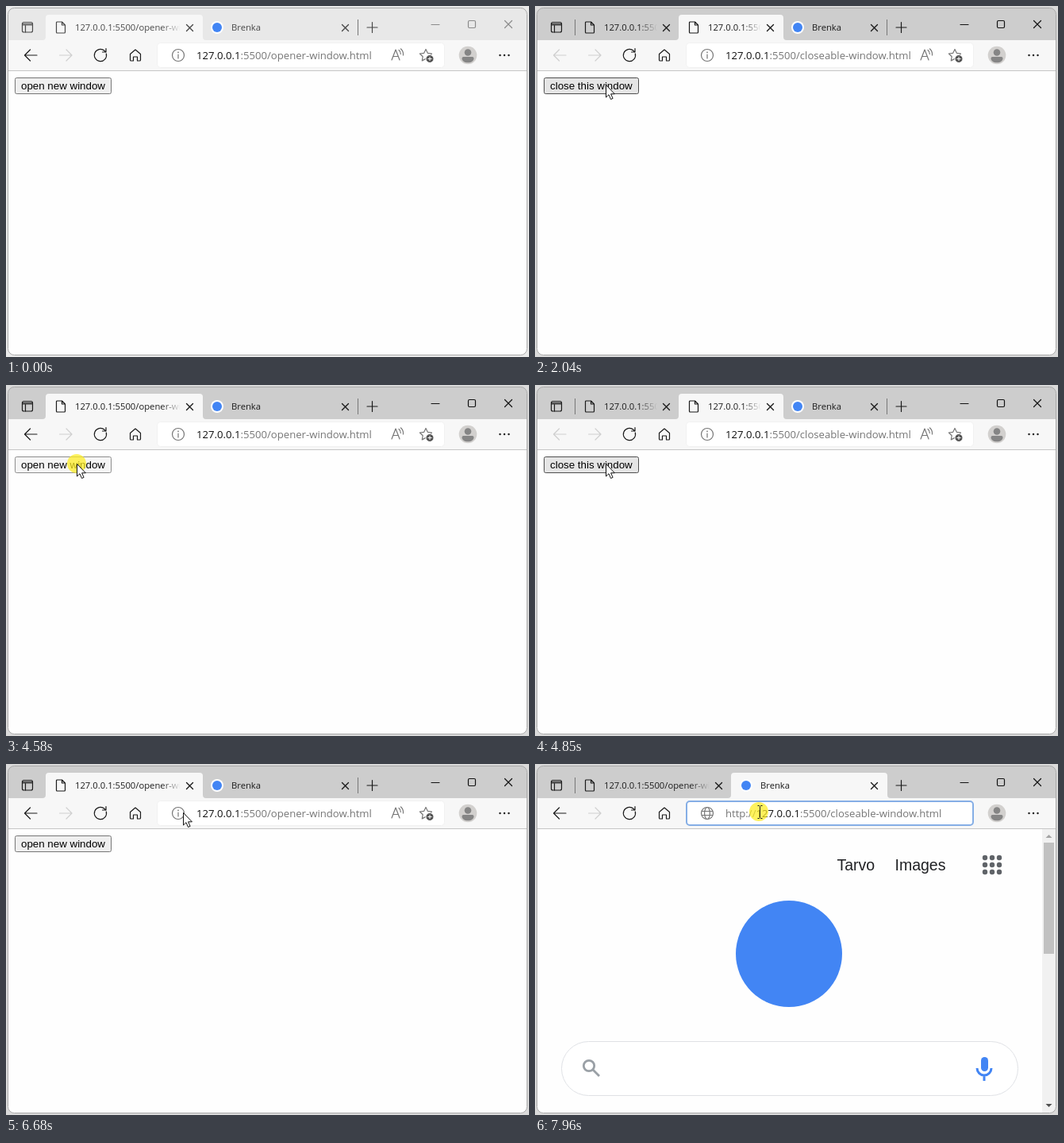
An HTML page that plays this animation: 659x442 px, repeating every 8000 ms.

```html
<!DOCTYPE html>
<html lang="en">
<head>
<meta charset="utf-8">
<title>Opening and closing a window</title>
<style>
html, body { margin: 0; width: 100%; height: 100%; overflow: hidden; }
svg { display: block; width: 659px; height: 442px; font-family: "Open Sans", "Noto Sans", sans-serif; }

/* every part shares one 8 s clock */
svg, .bar, .controls, .view, .btn, .sep-hover, .ring, .cursor, .arrow, .beam, .spot {
  animation: 8s step-end -4ms infinite;
}
svg { animation-name: ink; }
.bar { animation-name: bar; }
.controls { animation-name: controls; }
.opener { animation-name: opener; }
.closeable { animation-name: closeable; }
.search { animation-name: search; }
.btn { animation-name: btn; }
.sep-hover { animation-name: sep; }
.ring { animation-name: ring; }
.cursor { animation-name: move; }
.arrow { animation-name: arrow; }
.beam { animation-name: beam; }
.spot { animation-name: spot; }

.line { fill: none; stroke: currentColor; stroke-width: 1.2; stroke-linecap: round; stroke-linejoin: round; }
.dark { color: #1b1b1b; }
.grey { color: #767676; }
.off { color: #cfcfcf; }
.tab { font-size: 11.26px; }
.name { fill: currentColor; }
.url { font-size: 13.14px; fill: #767676; }
.url tspan { fill: #111; }
.label { font: 13.333px "Liberation Sans", Arial, sans-serif; fill: #000; }
.link { font: 19.5px "Liberation Sans", Arial, sans-serif; fill: #202124; }
.active { fill: #f7f7f7; }
stop { stop-color: currentColor; }
stop + stop { stop-opacity: 0; }

@keyframes ink { 0% { color: #484848; background: #eaeaea; } 22.125%, 100% { color: #1b1b1b; background: #dadada; } }
@keyframes bar { 0% { fill: #e8e8e8; } 22.125%, 100% { fill: #cdcdcd; } }
@keyframes controls { 0% { color: #8b8b8b; } 22.125%, 100% { color: #111; } }

@keyframes opener {
  0%, 44%, 77.25% { opacity: 1; }
  24.625%, 59.75%, 91.75%, 100% { opacity: 0; }
}
@keyframes closeable {
  0%, 44%, 77.25%, 100% { opacity: 0; }
  24.625%, 59.75% { opacity: 1; }
}
@keyframes search { 0% { opacity: 0; } 91.75%, 100% { opacity: 1; } }

/* normal, hovered, pressed */
@keyframes btn {
  0%, 24.625%, 44%, 59.75%, 77.25%, 80.875%, 100% { fill: #efefef; stroke: #767676; }
  16.25%, 23.75%, 25.5%, 43.125%, 44.875%, 58.875%, 60.625%, 76.375%, 78.125% { fill: #e5e5e5; stroke: #4f4f4f; }
  21.25%, 41.375%, 57.25%, 74.625% { fill: #f5f5f5; stroke: #8d8d8d; }
}
@keyframes sep { 0% { opacity: 1; } 87.75%, 100% { opacity: 0; } }
@keyframes ring { 0% { opacity: 0; } 98.625%, 100% { opacity: 1; } }

@keyframes move {
  0% { transform: translate(438px, 470px); }
  4.125% { transform: translate(438px, 430px); animation-timing-function: steps(4); }
  7.625% { transform: translate(292px, 346px); animation-timing-function: steps(4); }
  11.125% { transform: translate(162px, 206px); animation-timing-function: steps(3); }
  13.75% { transform: translate(100px, 114px); }
  14.625% { transform: translate(94px, 106px); }
  16.25% { transform: translate(90px, 101px); }
  17.125% { transform: translate(89px, 99px); }
  80.875% { transform: translate(112px, 93px); animation-timing-function: steps(3); }
  83.5% { transform: translate(223px, 61px); animation-timing-function: steps(3); }
  86.125% { transform: translate(283px, 31px); animation-timing-function: steps(3); }
  88.625% { transform: translate(296px, 24px); }
  93.5% { transform: translate(292px, 36px); }
  94.375% { transform: translate(286px, 53px); }
  95.25%, 100% { transform: translate(282px, 60px); }
}
@keyframes arrow { 0% { opacity: 1; } 94.375%, 100% { opacity: 0; } }
@keyframes beam { 0% { opacity: 0; } 94.375%, 100% { opacity: 1; } }
@keyframes spot {
  0%, 23.75%, 43.125%, 58.875%, 76.375%, 92.625% { opacity: 0; }
  21.25%, 41.375%, 57.25%, 74.625%, 90.875%, 97.75%, 100% { opacity: .72; }
}
</style>
</head>
<body>
<svg viewBox="0 0 659 442">
  <defs>
    <clipPath id="win"><rect x="2.5" y="2.5" width="654" height="437" rx="8"/></clipPath>
    <linearGradient id="fade1" gradientUnits="userSpaceOnUse" x1="130" x2="154"><stop/><stop offset="1"/></linearGradient>
    <linearGradient id="fade2" gradientUnits="userSpaceOnUse" x1="196" x2="220"><stop/><stop offset="1"/></linearGradient>
    <linearGradient id="fade3" gradientUnits="userSpaceOnUse" x1="261" x2="285"><stop/><stop offset="1"/></linearGradient>

    <path id="doc" class="line" d="M1.5 .5h6l4 4v9a1 1 0 0 1-1 1h-9a1 1 0 0 1-1-1v-12a1 1 0 0 1 1-1zM7.5 .5v4h4"/>
    <path id="cross" class="line" d="M-4 -4l8 8M4 -4l-8 8" style="stroke-width:1.35"/>
    <path id="sep" d="M.5 17v20" stroke="#777"/>
    <path id="back" class="line" d="M39 62H23.5m7-7l-7 7 7 7"/>
    <g id="icon"><circle r="8" fill="#fff"/><circle r="6" fill="#4285f4"/></g>

    <g id="tools" class="grey">
      <circle class="line" cx="217" cy="62" r="7.5"/>
      <path class="line" d="M217 61v5"/><circle cx="217" cy="58.3" r=".9" fill="#767676"/>
      <path class="line" d="M486 68l5-13 5 13m-8.300-4.500h6.600M495 55.500q2.500 2 2.300 5M497.500 54q3.500 3 3 8"/>
      <path class="line" d="M529 54.500l2.300 4.800 5.200.7-3.800 3.700.8 5.200-4.500-2.500-4.700 2.500.9-5.200-3.800-3.700 5.300-.7z"/>
      <circle cx="534" cy="66.500" r="5" fill="#555" stroke="#fff"/>
      <path d="M531.500 66.500h5m-2.500-2.500v5" stroke="#fff"/>
    </g>
  </defs>

  <g clip-path="url(#win)">
    <rect class="bar" width="659" height="50"/>
    <rect y="43" width="659" height="38" fill="#f7f7f7"/>
    <rect y="81" width="659" height="1" fill="#c6c6c6"/>
    <rect y="82" width="659" height="360" fill="#fefefe"/>

    <g class="controls">
      <path class="line" stroke-linecap="butt" d="M536 23.500h10M628.500 18.500l9 9m0-9l-9 9"/>
      <rect class="line" x="582.500" y="18.500" width="9" height="9" rx="1.500"/>
    </g>
    <rect class="line" x="20.500" y="20.500" width="13" height="12.500" rx="2"/>
    <path class="line" d="M21 22.500h12M21 24h12M24.500 24v9"/>
    <path class="line" d="M461.500 20.500v13M455 27h13"/>

    <g class="dark">
      <path class="line" d="M126.300 60a7.600 7.600 0 1 1-2.300-3.700l1.700 1.700m.300-4.500v4.500h-4.500"/>
      <path class="line" d="M156.500 60.500l6.500-5.500 6.500 5.500v7.500a1 1 0 0 1-1 1h-3v-5h-5v5h-3a1 1 0 0 1-1-1z"/>
      <path d="M622.500 62h.01M628 62h.01M633.500 62h.01" stroke="#222" stroke-width="2.500" stroke-linecap="round"/>
    </g>
    <path class="line off" d="M67.500 62H83m-7-7l7 7-7 7"/>
    <rect x="190.500" y="46.500" width="362" height="31" rx="4" fill="#fff" stroke="#f1f1f1"/>
    <circle cx="582" cy="62" r="11.300" fill="#d2d0ce"/>
    <circle cx="582" cy="58.500" r="4.300" fill="#858585"/>
    <path d="M574.500 66q0-2 2-2h11q2 0 2 2c0 3-3 5.300-7.500 5.300s-7.500-2.300-7.500-5.300z" fill="#858585"/>

    <g class="view opener">
      <path class="active" d="M46 43q4 0 4-4v-24q0-4 4-4h190q4 0 4 4v24q0 4 4 4z"/>
      <use href="#doc" x="63" y="19.500"/>
      <text class="tab" x="87" y="31" fill="url(#fade2)">127.0.0.1:5500/opener-window</text>
      <use href="#cross" x="231.500" y="27.500"/>
      <use href="#icon" x="266" y="27"/>
      <text class="tab name" x="284" y="31">Brenka</text>
      <use href="#cross" x="427.500" y="27.500"/>
      <use class="sep-hover" href="#sep" x="443"/>
      <use class="dark" href="#back"/>
      <use href="#tools"/>
      <text class="url" x="240" y="67"><tspan>127.0.0.1</tspan>:5500/opener-window.html</text>
      <rect class="btn" x="11.500" y="90.500" width="121" height="20" rx="2"/>
      <text class="label" x="19" y="105">open new window</text>
    </g>

    <g class="view closeable">
      <path class="active" d="M177 43q4 0 4-4v-24q0-4 4-4h124q4 0 4 4v24q0 4 4 4z"/>
      <use href="#sep" x="50"/>
      <use href="#doc" x="63" y="19.500"/>
      <text class="tab" x="87" y="31" fill="url(#fade1)">127.0.0.1:5500</text>
      <use href="#cross" x="165.500" y="27.500"/>
      <use href="#doc" x="194" y="19.500"/>
      <text class="tab" x="218" y="31" fill="url(#fade3)">127.0.0.1:5500</text>
      <use href="#cross" x="296.500" y="27.500"/>
      <use href="#icon" x="331" y="27"/>
      <text class="tab name" x="349" y="31">Brenka</text>
      <use href="#cross" x="427.500" y="27.500"/>
      <use href="#sep" x="443"/>
      <use class="off" href="#back"/>
      <use href="#tools"/>
      <text class="url" x="240" y="67"><tspan>127.0.0.1</tspan>:5500/closeable-window.html</text>
      <rect class="btn" x="11.500" y="90.500" width="119" height="20" rx="2"/>
      <text class="label" x="19" y="105">close this window</text>
    </g>

    <g class="view search">
      <path class="active" d="M243 43q4 0 4-4v-24q0-4 4-4h189q4 0 4 4v24q0 4 4 4z"/>
      <use href="#sep" x="50"/>
      <use href="#doc" x="63" y="19.500"/>
      <text class="tab" x="87" y="31" fill="url(#fade2)">127.0.0.1:5500/opener-window</text>
      <use href="#cross" x="231.500" y="27.500"/>
      <use href="#icon" x="266" y="27"/>
      <text class="tab name" x="284" y="31">Brenka</text>
      <use href="#cross" x="427.500" y="27.500"/>
      <use class="dark" href="#back"/>
      <rect class="ring" x="191" y="47" width="361" height="30" rx="4" fill="#fff" stroke="#85aee6" stroke-width="2"/>
      <g class="grey">
        <circle class="line" cx="217" cy="62" r="7.500"/>
        <ellipse class="line" cx="217" cy="62" rx="3.400" ry="7.500"/>
        <path class="line" d="M210.500 59.500h13M210.500 64.500h13"/>
      </g>
      <text class="url" x="240" y="67">http://<tspan>127.0.0.1</tspan>:5500/closeable-window.html</text>

      <text class="link" x="380.500" y="134">Tarvo</text>
      <text class="link" x="453.500" y="134">Images</text>
      <path d="M567.500 118h18.100M567.500 127h18.100M567.500 136h18.100" transform="translate(-.5)" fill="none" stroke="#5f6368" stroke-width="6.400" stroke-linecap="round" stroke-dasharray="0 9"/>
      <circle cx="320" cy="239" r="67" fill="#4285f4"/>
      <rect x="33.500" y="349.500" width="575" height="68" rx="34" fill="#fff" stroke="#dfe1e5"/>
      <g fill="none" stroke="#9aa0a6" stroke-width="2.800">
        <circle cx="68" cy="380" r="6.700"/><path d="M73 385l8 8"/>
      </g>
      <rect x="562" y="369" width="9" height="18" rx="4.500" fill="#4285f4"/>
      <path d="M557 383a9 9 0 0 0 18 0M566 392v7" fill="none" stroke="#4285f4" stroke-width="3"/>
      <rect x="639" y="82" width="17" height="358" fill="#f1f1f1"/>
      <rect x="641" y="99" width="13" height="140" fill="#c1c1c1"/>
      <path d="M643.500 93h8l-4-4z" fill="#a3a3a3"/>
      <path d="M643.500 428h8l-4 4z" fill="#505050"/>
    </g>
  </g>
  <rect x="2.500" y="2.500" width="654" height="437" rx="8" fill="none" stroke="#a8a8a8"/>

  <g class="cursor">
    <circle class="spot" r="12" fill="#ffee20"/>
    <path class="arrow" d="M.5 .5v15.500l3.500-3.300 2.500 5.800 2.600-1.100-2.500-5.600h4.800z" fill="#fff" stroke="#111"/>
    <path class="beam" d="M-1.500 -7.500h2l1 1 1-1h2M1.500 -6.500v14M-1.500 8.500h2l1-1 1 1h2" fill="none" stroke="#222"/>
  </g>
</svg>
</body>
</html>
```
